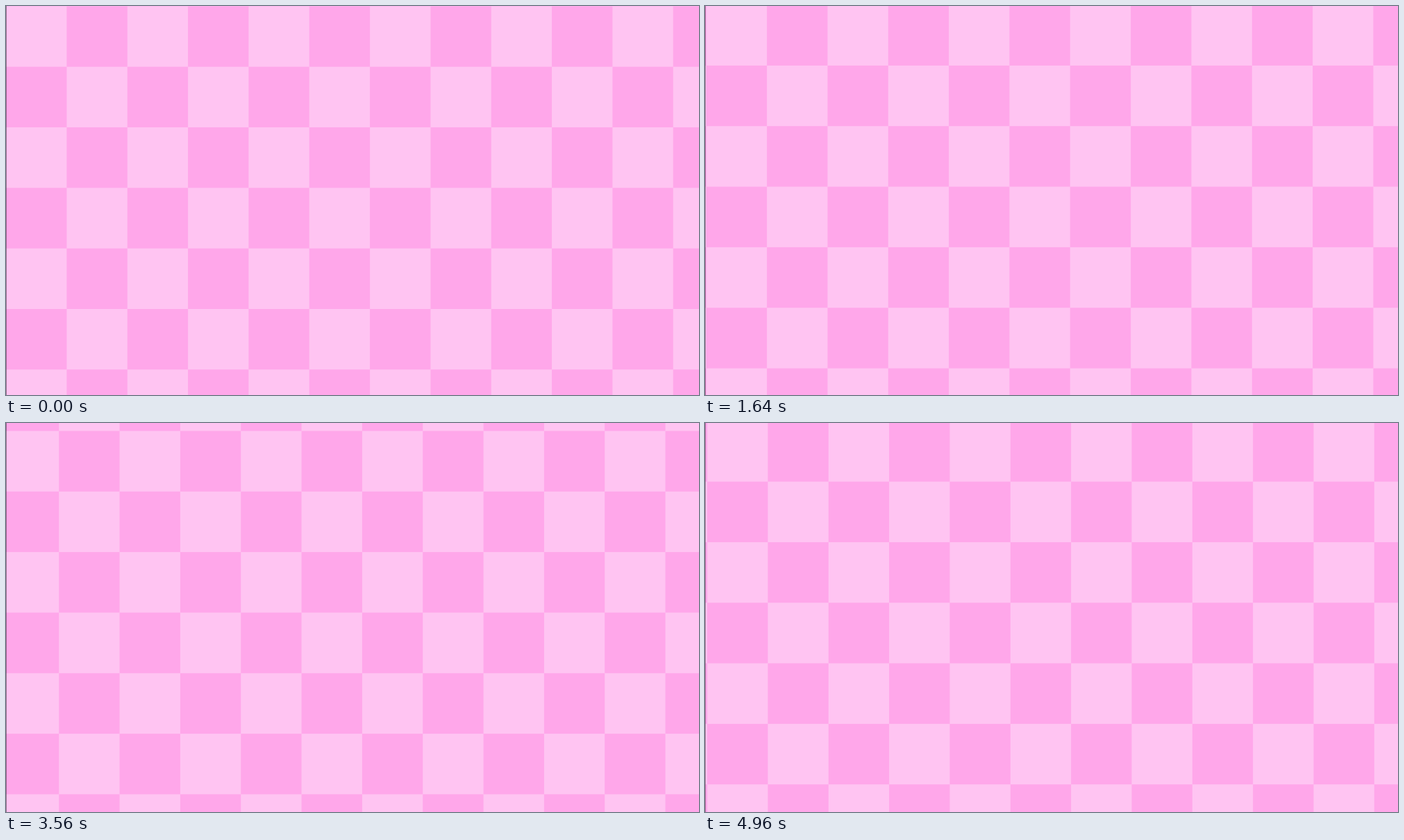
Recreate the animation shown at these times as an HTML page with a canvas. Size 998 by 561 pixels, loop 5000 ms.

```html
<!DOCTYPE html>
<html>
<head>
<meta charset="utf-8">
<style>
  html, body { margin: 0; overflow: hidden; }
  canvas { display: block; }
</style>
</head>
<body>
<canvas id="stage" width="998" height="561"></canvas>
<script>
const ctx = document.getElementById('stage').getContext('2d');
const CELL = 87.33, SPEED = 0.0522, LOOP = 5000, STEP = 40;

function draw(t) {
  const shift = SPEED * t % CELL;
  ctx.fillStyle = '#ffc4f2';
  ctx.fillRect(0, 0, 998, 561);

  // The board slides left and down; one diagonal cell is a full repeat.
  ctx.fillStyle = '#ffa7ea';
  for (let row = -2; row < 7; row++)
    for (let col = -1; col < 13; col++)
      if ((row + col) & 1)
        ctx.fillRect(0.1 + col * CELL - shift, 0.3 + row * CELL + shift, CELL, CELL);

  // Dark hairline on the left edge
  ctx.fillStyle = 'rgba(0, 0, 0, 0.42)';
  ctx.fillRect(0, 0, 1, 561);
}

function tick() {
  const t = performance.now() % LOOP;
  draw(Math.floor(t / STEP) * STEP);
  requestAnimationFrame(tick);
}
tick();
</script>
</body>
</html>
```
